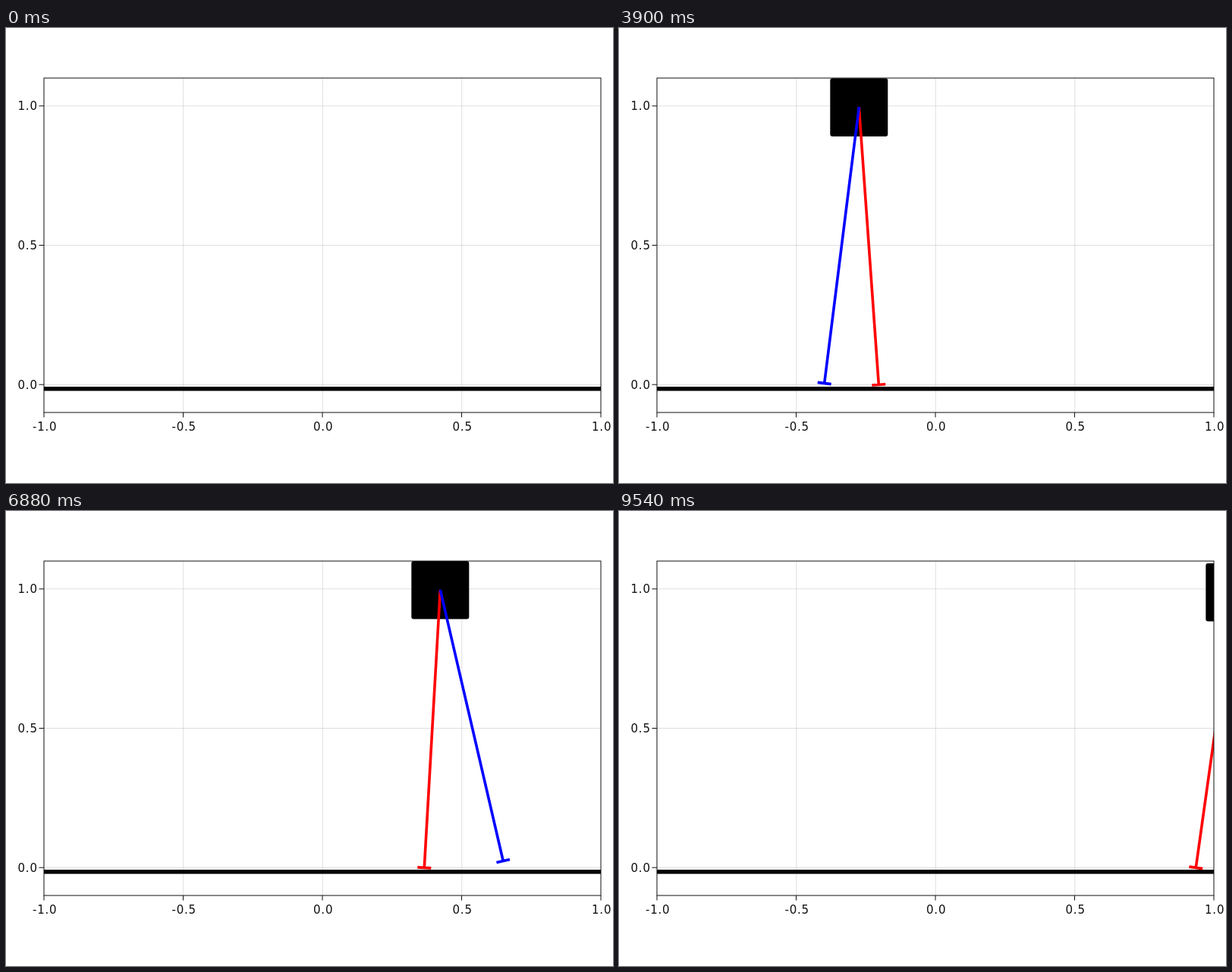
Animation of 800x600 px, one loop 9.56 s. Source, as an HTML page:

```html
<!DOCTYPE html>
<html lang="en">
<head>
<meta charset="utf-8">
<title>Compass walker</title>
<style>
  html, body { margin: 0; width: 100%; height: 100%; overflow: hidden; background: #fff; }
  svg { display: block; width: 800px; height: 600px; }
  text { font: 15px "DejaVu Sans", sans-serif; letter-spacing: .8px; fill: #111; }
  .grid { stroke: #000; stroke-opacity: .13; }
  .axis { stroke: #111; fill: none; }
  .leg { fill: none; stroke-width: 3.6; }
</style>
</head>
<body>
<svg viewBox="0 0 800 600">
  <clipPath id="area"><rect x="50" y="66" width="734" height="441"/></clipPath>
  <g id="grid" class="grid"></g>
  <g clip-path="url(#area)">
    <path d="M50 475.8H784" stroke="#000" stroke-width="5.6"/>
    <g id="walker">
      <rect id="body" width="76" height="76.6" rx="3"/>
      <path id="stance" class="leg" stroke="#f00"/>
      <path id="swing" class="leg" stroke="#00f"/>
    </g>
  </g>
  <g id="axis" class="axis"><rect x="50" y="66" width="734" height="441"/></g>
  <g id="labels"></g>
</svg>
<script>
const NS = 'http://www.w3.org/2000/svg';
const $ = id => document.getElementById(id);

function add(parent, tag, attrs, text = '') {
  const el = document.createElementNS(NS, tag);
  for (const key in attrs) el.setAttribute(key, attrs[key]);
  el.textContent = text;
  $(parent).append(el);
}

// Axes
const UNIT = 367.2, GROUND = 470.4;
for (let v = -1; v <= 1; v += 0.5) {
  const x = 417 + 367 * v;
  if (Math.abs(v) < 1) add('grid', 'path', { d: `M${x + .3} 66V507` });
  add('axis', 'path', { d: `M${x} 507v6.5` });
  add('labels', 'text', { x: x - (v < 0 ? 15 : 12), y: 530.6 }, v.toFixed(1));
}
for (let v = 0; v <= 1; v += 0.5) {
  const y = 470.2 - 367.4 * v;
  add('grid', 'path', { d: `M50 ${y}H784` });
  add('axis', 'path', { d: `M50 ${y}h-6.5` });
  add('labels', 'text', { x: 15.5, y: y + 5.6 }, v.toFixed(1));
}

// Offsets from the planted foot over one step: [tick, offset in leg lengths]
const HIP = [[0, -.1427], [2.5, -.103], [5.2, -.0708], [8.7, -.0443], [11.7, -.0218],
  [13.2, -.0075], [17.7, .040], [19.2, .0572], [22, .092], [24.7, .1325], [25.5, .1427]];
const FOOT = [[0, -.285], [2, -.273], [4, -.236], [5.2, -.195], [8.5, -.045], [11.7, .106],
  [13.2, .168], [15.5, .238], [17.7, .273], [19.2, .283], [22, .291], [25.5, .285]];

// Smooth curve through the points
function curve(pts, x) {
  let i = 0;
  while (i < pts.length - 2 && x > pts[i + 1][0]) i++;
  const slope = j => {
    const a = pts[Math.max(j - 1, 0)], b = pts[Math.min(j + 1, pts.length - 1)];
    return (b[1] - a[1]) / (b[0] - a[0]);
  };
  const [x0, y0] = pts[i], [x1, y1] = pts[i + 1];
  const h = x1 - x0, s = (x - x0) / h, r = 1 - s;
  return y0 * r * r * (1 + 2 * s) + y1 * s * s * (3 - 2 * s)
    + h * s * r * (slope(i) * r - slope(i + 1) * s);
}

// Leg of unit length with a short foot across its end
function legPath(hipX, hipY, footX) {
  const sin = (footX - hipX) / UNIT, cos = Math.sqrt(1 - sin * sin);
  const footY = hipY + UNIT * cos, dx = 9 * cos, dy = -9 * sin;
  return `M${hipX} ${hipY}L${footX} ${footY}M${footX - dx} ${footY - dy}L${footX + dx} ${footY + dy}`;
}

const LOOP = 9560, STEP_TICKS = 25.5, FIRST_STEP = 16.8, STRIDE = 104.5;

// Ticks come in bursts of three, 20 ms apart, every 140 ms
function tickAt(t) {
  const u = t - 400;
  return 3 * Math.floor(u / 140) + Math.min(2, Math.floor(u % 140 / 20)) - 2;
}

function draw(t) {
  const shown = t >= 440;
  $('walker').setAttribute('visibility', shown ? 'visible' : 'hidden');
  if (!shown) return;
  const n = tickAt(t) - FIRST_STEP;
  const step = Math.floor(n / STEP_TICKS), phase = n - step * STEP_TICKS;
  const foot = 133.3 + STRIDE * step;
  const lean = curve(HIP, phase);
  const hipX = foot + UNIT * lean, hipY = GROUND - UNIT * Math.sqrt(1 - lean * lean);
  $('body').setAttribute('x', hipX - 38);
  $('body').setAttribute('y', hipY - 37.8);
  $('stance').setAttribute('d', legPath(hipX, hipY, foot));
  $('swing').setAttribute('d', legPath(hipX, hipY, foot + UNIT * curve(FOOT, phase)));
}

const start = performance.now();
function frame() {
  draw((performance.now() - start) % LOOP);
  requestAnimationFrame(frame);
}
frame();
</script>
</body>
</html>
```
